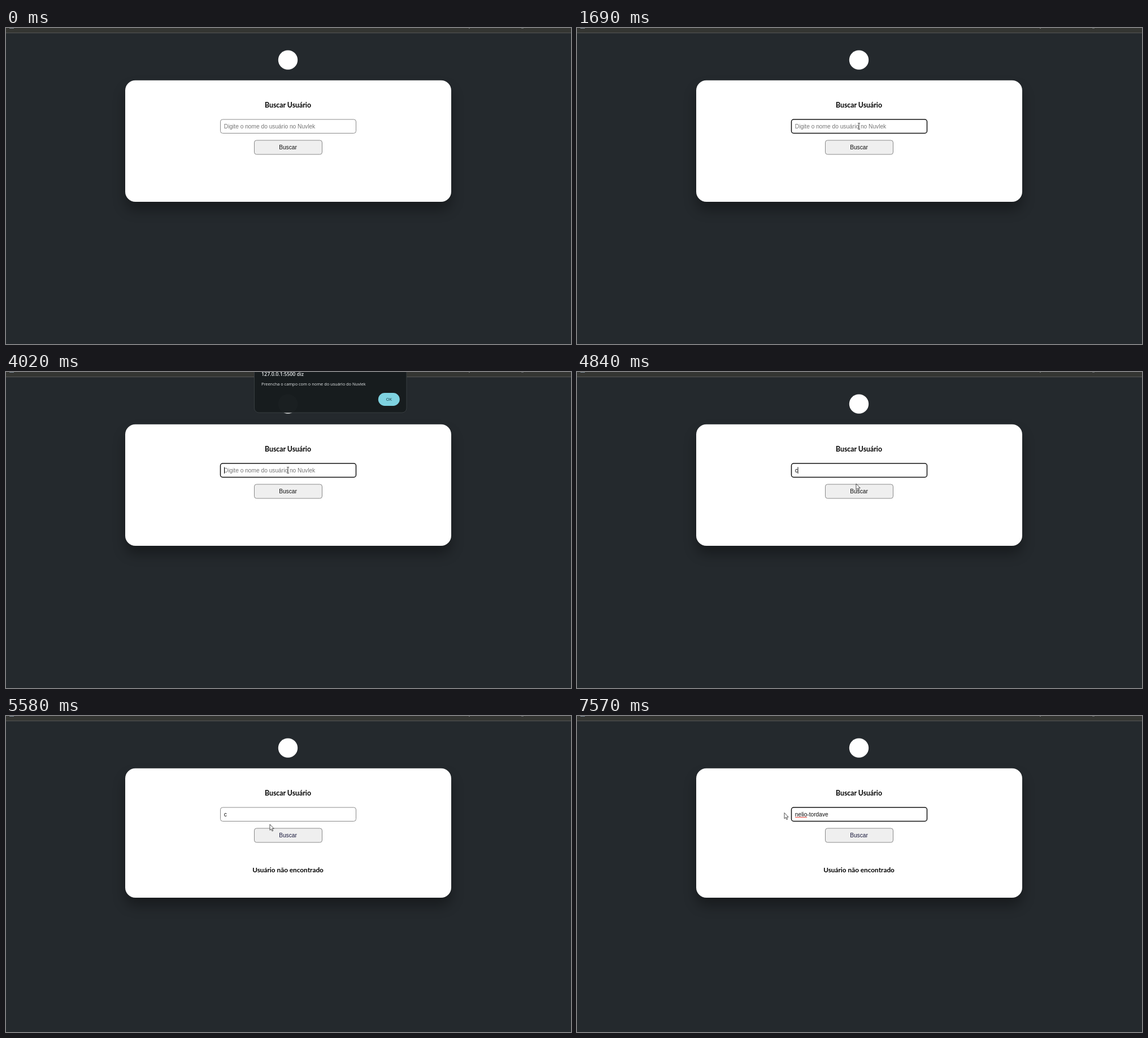
Recreate the animation shown at these times as an HTML page. Size 1000x560 px, loop 8000 ms.

```html
<!DOCTYPE html>
<html lang="pt-BR">
<head>
<meta charset="utf-8">
<title>Buscar Usuário</title>
<style>
  html, body { margin: 0; width: 100%; height: 100%; overflow: hidden; background: #24292d; }
  svg { display: block; width: 100%; height: 100%; }
  .form { font: 10.2px "Liberation Sans", Arial, sans-serif; }
  .head { font: 700 12.3px Lato, sans-serif; text-anchor: middle; }
  .ui { font: 7.4px "Open Sans", sans-serif; fill: #e9eced; }
  .mid { text-anchor: middle; }
</style>
</head>
<body>
<svg viewBox="0 0 1000 560">
  <defs>
    <filter id="blur" x="-20%" y="-30%" width="140%" height="160%">
      <feGaussianBlur stdDeviation="11"/>
    </filter>
  </defs>
  <rect width="1000" height="560" fill="#24292d"/>

  <rect width="1000" height="8" fill="#343532"/>
  <rect y="8" width="1000" height="1.2" fill="#505251"/>
  <rect x="6" width="8" height="1" fill="#7d8c99"/>
  <rect x="819" width="2" height="1" fill="#77797a"/>
  <rect x="912" width="4" height="1" fill="#66696a"/>

  <circle cx="499" cy="56.6" r="17.2" fill="#fff"/>

  <rect id="shadow" x="211" y="107" width="577" rx="18" opacity=".33" filter="url(#blur)"/>
  <rect id="card" x="211" y="92.7" width="577" rx="18" fill="#fff"/>
  <text class="head" x="499" y="140.5">Buscar Usuário</text>

  <rect id="field" x="379.5" y="162" width="240" height="24.5" rx="4" fill="#fff"/>
  <rect id="mark" x="386" y="168" width="5.2" height="12" fill="#3367d1"/>
  <text id="value" class="form" x="385.8" y="177.6"></text>
  <path id="squiggle" fill="none" stroke="#e8332a" stroke-width=".8"/>
  <rect id="caret" y="168.5" width="1" height="11.5" fill="#111"/>

  <rect id="button" x="439.5" y="199" width="120" height="25" rx="4" stroke="#8a8a8a"/>
  <text id="label" class="form mid" x="499" y="214.8">Buscar</text>
  <text id="result" class="head" x="499" y="277" style="font-size:11.8px">Usuário não encontrado</text>

  <g id="dialog">
    <rect x="439.5" y="-30" width="269.5" height="103.5" rx="8" fill="#171c1e" stroke="#383e41"/>
    <text class="ui" x="452" y="8.4" style="font-weight:600;font-size:8.9px">127.0.0.1:5500 diz</text>
    <text class="ui" x="452" y="25.6">Preencha o campo com o nome do usuário do Nuvlek</text>
    <rect id="ring" x="656.7" y="36.7" width="42" height="26.6" rx="13.3" fill="none" stroke="#80d5e3" stroke-width="1.3"/>
    <rect x="658.8" y="38.6" width="38" height="22.8" rx="11.4" fill="#80d5e3"/>
    <text class="ui mid" x="677.8" y="52.7" style="fill:#12363d">OK</text>
  </g>

  <path id="arrow" d="M0 0V10.4L2.4 8.2L4 12L5.7 11.3L4.1 7.6H7.2Z" fill="#fff" stroke="#222" stroke-width=".8"/>
  <path id="beam" d="M-2 -5.3H-.5L0 -4.8L.5 -5.3H2M0 -4.8V4.8M-2 5.3H-.5L0 4.8L.5 5.3H2" fill="none" stroke="#222" stroke-width=".9"/>
</svg>
<script>
const LOOP = 8000, TICK = 67;
const PLACEHOLDER = 'Digite o nome do usuário no Nuvlek';
const USER = 'nelio-tordave';

// Pointer stops: time, x, y
const PATH = [
  [130, 882, 484], [500, 640, 270], [750, 510, 158], [871, 499, 172], [1072, 499, 174],
  [4430, 499, 174], [4824, 494, 198], [4958, 493, 214],
  [5180, 493, 214], [5561, 467, 192], [5896, 400, 172],
  [6100, 400, 172], [6365, 367, 171.5]
];

const ui = {};
document.querySelectorAll('[id]').forEach(el => ui[el.id] = el);
const set = (el, attrs) => { for (const k in attrs) el.setAttribute(k, attrs[k]); };
const show = (el, on) => el.style.display = on ? '' : 'none';
const within = (t, a, b) => t >= a && t < b;

// Progress in n held steps: the first lands at a, the last at b
const steps = (t, a, b, n) =>
  t < a ? 0 : Math.min(1, (Math.floor((t - a) / (b - a) * (n - 1) + .01) + 1) / n);

function pointerAt(t) {
  const i = PATH.findIndex(p => p[0] > t);
  if (i < 0) return PATH[PATH.length - 1].slice(1);
  if (i === 0) return PATH[0].slice(1);
  const [a, b] = [PATH[i - 1], PATH[i]];
  const k = (t - a[0]) / (b[0] - a[0]);
  return [a[1] + (b[1] - a[1]) * k, a[2] + (b[2] - a[2]) * k];
}

function drawPointer(t) {
  const [x, y] = pointerAt(Math.floor((t + 20) / TICK) * TICK);
  const overField = x > 379 && x < 620 && y > 161 && y < 187;
  show(ui.arrow, t >= 130 && !overField);
  show(ui.beam, t >= 130 && overField);
  set(overField ? ui.beam : ui.arrow, { transform: `translate(${x} ${y})` });
  return x > 439 && x < 560 && y > 199 && y < 224;
}

function drawField(t) {
  const focus = within(t, 1220, 5180) || t >= 6120;
  const text = t < 4430 ? PLACEHOLDER : t < 7040 ? 'c' : USER;
  const caretOn = within(t, 1220, 1690) || within(t, 2290, 4930) || within(t, 7040, 7570);
  const selected = within(t, 6310, 7040);
  set(ui.field, { stroke: focus ? '#111' : '#8a8a8a', 'stroke-width': focus ? 1.5 : 1 });
  ui.value.textContent = text;
  set(ui.value, { fill: t < 4430 ? '#757575' : selected ? '#fff' : '#111' });
  show(ui.mark, selected);
  show(ui.caret, caretOn);
  set(ui.caret, { x: t < 4430 ? 386 : t < 7040 ? 390.5 : 445 });
  show(ui.squiggle, t >= 7040);
}

function drawCard(t, hover) {
  const found = t >= 5380;
  const height = found ? 229.3 : 215.3;
  set(ui.card, { height });
  set(ui.shadow, { height });
  show(ui.result, found);
  set(ui.button, { fill: hover ? '#e5e5e5' : '#efefef' });
  set(ui.label, { fill: t < 5180 ? '#111' : '#19193c' });
}

function drawDialog(t) {
  const away = t < 4020 ? 1 - steps(t, 2490, 2630, 3) : steps(t, 4020, 4230, 4);
  show(ui.dialog, away < 1);
  show(ui.ring, t < 4020);
  set(ui.dialog, { transform: `translate(0 ${-24 * away ** 2})`, opacity: 1 - away ** 3 });
}

function draw(t) {
  const hover = drawPointer(t);
  drawField(t);
  drawCard(t, hover);
  drawDialog(t);
}

let wave = 'M386 180';
for (let x = 387; x < 408; x++) wave += `L${x} ${x % 2 ? 178.9 : 180.2}`;
set(ui.squiggle, { d: wave });

const start = performance.now();
(function frame() {
  draw((performance.now() - start) % LOOP);
  requestAnimationFrame(frame);
})();
</script>
</body>
</html>
```
